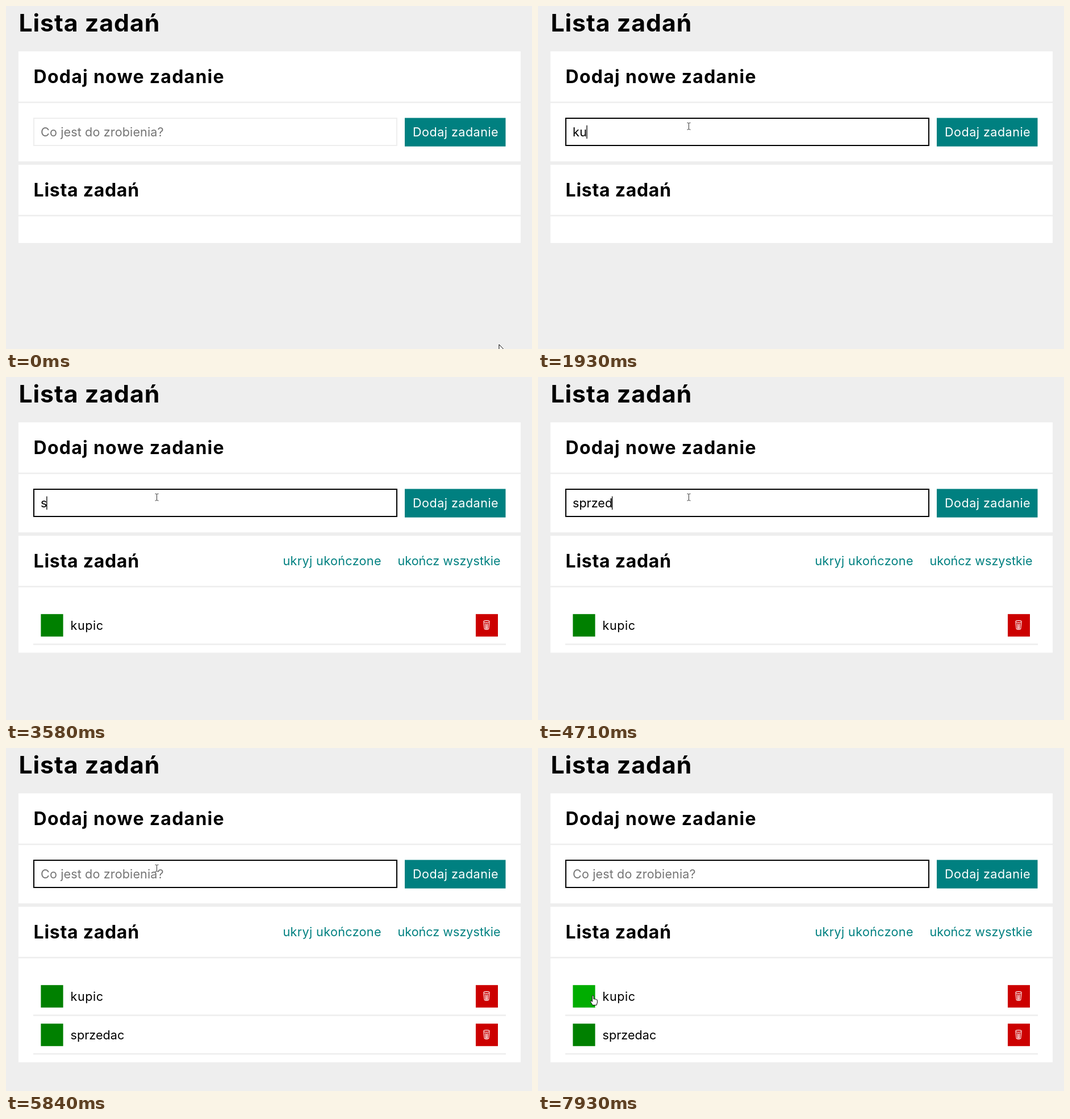
An HTML page for the animation above (8000 ms loop, 926x605 px).

```html
<!DOCTYPE html>
<html lang="pl">
<head>
<meta charset="utf-8">
<title>Lista zadań</title>
<style>
  html, body { margin: 0; width: 100%; height: 100%; overflow: hidden; background: #eee; }
  svg { display: block; width: 926px; height: 605px; }
  text {
    font-family: Inter, "Open Sans", sans-serif;
    font-size: 21.6px;
    font-optical-sizing: none;
  }
  .h1 { font-size: 42.8px; font-weight: 700; letter-spacing: .95px; }
  .h2 { font-size: 32px; font-weight: 700; letter-spacing: .72px; }
  .wide { letter-spacing: 1.26px; }
  .panel { fill: #fff; }
  .rule { fill: #eee; }
  .link { fill: #008080; }
</style>
</head>
<body>
<svg viewBox="0 0 926 605">
  <defs>
    <g id="trash" fill="none" stroke="#fff" stroke-width="1.1">
      <ellipse cx="846" cy="431.5" rx="5.2" ry="1.9"/>
      <path d="M841 433L842.3 444.3Q846 446.6 849.7 444.3L851 433M844 435L844.6 444M846 435.4V444.4M848 435L847.4 444"/>
    </g>
  </defs>
  <rect width="926" height="605" fill="#eee"/>
  <text class="h1" x="22.4" y="45">Lista zadań</text>

  <rect class="panel" x="22" y="80" width="884" height="194"/>
  <text class="h2 wide" x="48.6" y="135.5">Dodaj nowe zadanie</text>
  <rect class="rule" x="22" y="168.6" width="884" height="2.6"/>
  <rect id="field" x="49" y="198" width="639" height="48" fill="#fff" stroke-width="2"/>
  <text id="hint" x="61" y="230" fill="#757575" letter-spacing=".12">Co jest do zrobienia?</text>
  <text id="typed" x="61" y="230"></text>
  <rect id="caret" y="210.5" width="1.3" height="23.5"/>
  <rect x="702" y="197.4" width="177.5" height="50.3" fill="#008080"/>
  <text x="716" y="230" fill="#fff" letter-spacing=".46">Dodaj zadanie</text>

  <rect id="list" class="panel" x="22" y="280" width="884"/>
  <text class="h2" x="48.6" y="336">Lista zadań</text>
  <rect class="rule" x="22" y="368.4" width="884" height="2.6"/>
  <g id="links" class="link">
    <text x="487.5" y="332.3" letter-spacing=".34">ukryj ukończone</text>
    <text x="689.5" y="332.3">ukończ wszystkie</text>
  </g>
  <g id="rows"></g>

  <path id="arrow" d="M0 0V15.5L3.6 12.2L6 17.6L8.3 16.6L6 11.3H10.6Z" fill="#fff" stroke="#000" stroke-width="1"/>
  <path id="beam" d="M-3 -6H-1L0 -5L1 -6H3M0 -5V5M-3 6H-1L0 5L1 6H3" fill="none" stroke="#333" stroke-width="1"/>
  <path id="hand" d="M-1.6 1Q-1.6 -.4 -.3 -.4Q1 -.4 1 1V6Q2.4 5 3.4 6.3Q4.9 5.4 5.7 6.9Q7.4 6.4 7.4 8.2V12L6 16.5H-.8L-4.7 10.5Q-4.9 8.6 -3.2 8.9L-1.6 10.5Z" fill="#fff" stroke="#000" stroke-width="1"/>
</svg>
<script>
const LOOP = 8000;
const ROW = 68;
const $ = id => document.getElementById(id);
const show = (el, on) => el.setAttribute('display', on ? 'inline' : 'none');
const within = (t, spans) => spans.some(([a, b]) => t >= a && t < b);

const tasks = [
  { name: 'kupic', spacing: .5, keys: [1730, 1930, 2190, 2320, 2450], done: 3180 },
  { name: 'sprzedac', spacing: 0, keys: [3580, 3710, 3910, 4180, 4440, 4710, 4910, 5180], done: 5840 }
];
const caretOn = [[650, 1180], [1730, 2980], [3510, 5770], [6240, 6790], [7320, 7860]];

$('rows').innerHTML = tasks.map((task, i) => `
  <g transform="translate(0 ${i * ROW})">
    <rect class="check" x="61.4" y="418.2" width="39.2" height="39.6" fill="#008000"/>
    <text x="113.6" y="445.5" letter-spacing="${task.spacing}">${task.name}</text>
    <rect x="827" y="418.2" width="39" height="39.6" fill="#c00"/>
    <use href="#trash"/>
    <rect class="rule" x="48" y="470.2" width="832" height="2.6"/>
  </g>`).join('');
const rows = [...$('rows').children];
const check = rows[0].querySelector('.check');

function bezier(points, p) {
  while (points.length > 1) {
    points = points.slice(1).map((b, i) => {
      const a = points[i];
      return [a[0] + (b[0] - a[0]) * p, a[1] + (b[1] - a[1]) * p];
    });
  }
  return points[0];
}

// Progress in n equal jumps, the first one at the start time
const jumps = (t, start, gap, n) => Math.min(1, (Math.floor((t - start) / gap) + 1) / n);

function pointer(t) {
  if (t < 70) return [868, 597];
  if (t < 450) return bezier([[868, 597], [420, 230], [270, 204]], jumps(t, 70, 60, 3));
  if (t < 7050) return bezier([[270, 204], [265.5, 212]], jumps(t, 450, 70, 3));
  if (t < 7860) {
    const p = jumps(t, 7050, 82, 10);
    return bezier([[265.5, 212], [365, 275], [215, 420], [101, 432]], p * p * (3 - 2 * p));
  }
  return [97, 437];
}

function drawPointer(t) {
  const [x, y] = pointer(t);
  const inField = x > 48 && x < 689 && y > 197 && y < 247;
  const kind = t >= 7860 ? 'hand' : inField ? 'beam' : 'arrow';
  for (const id of ['arrow', 'beam', 'hand']) show($(id), id === kind);
  $(kind).setAttribute('transform', `translate(${x} ${y})`);
}

function draw(t) {
  const added = tasks.filter(task => t >= task.done).length;
  const current = tasks[added];
  const text = current ? current.name.slice(0, current.keys.filter(k => t >= k).length) : '';

  $('typed').textContent = text;
  $('typed').setAttribute('letter-spacing', current ? current.spacing : 0);
  show($('hint'), !text);
  $('field').setAttribute('stroke', t < 650 ? '#eee' : '#000');
  show($('caret'), within(t, caretOn));
  $('caret').setAttribute('x', text ? 59.8 + $('typed').getComputedTextLength() : 61);

  $('list').setAttribute('height', added ? 138.3 + added * ROW : 138);
  show($('links'), added);
  rows.forEach((row, i) => show(row, i < added));
  check.setAttribute('fill', t < 7860 ? '#008000' : t < 7930 ? '#009700' : '#00ad00');

  drawPointer(t);
}

function tick() {
  draw(performance.now() % LOOP);
  requestAnimationFrame(tick);
}
tick();
</script>
</body>
</html>
```
